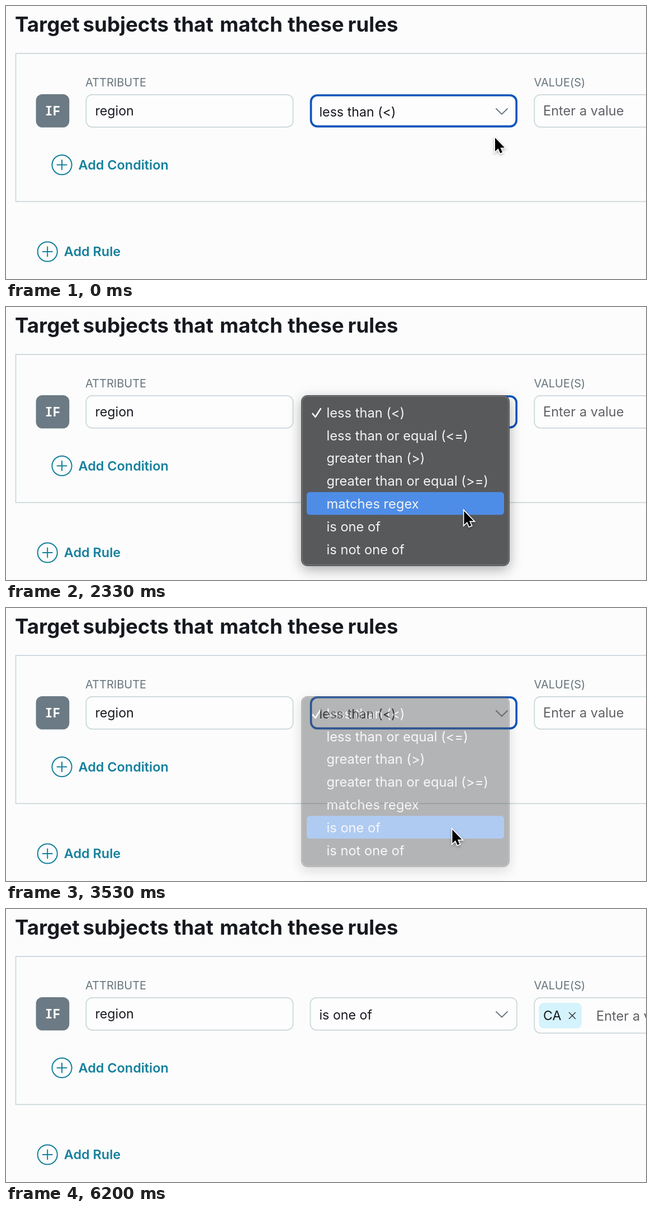
Recreate the animation shown at these times as an HTML page. Size 1145 px wide and 489 px high, loop 6270 ms.

```html
<!DOCTYPE html>
<html lang="en">
<head>
<meta charset="utf-8">
<title>Targeting rules</title>
<style>
  html, body { margin: 0; width: 100%; height: 100%; overflow: hidden; background: #fcfcfc; }
  svg { display: block; width: 100%; height: 100%; }
  text { font: 400 23.2px Inter, sans-serif; font-feature-settings: "calt" 0; fill: #16191f; white-space: pre; }
  .title { font-weight: 700; font-size: 36.7px; }
  .label { font-size: 20px; fill: #66757d; }
  .link { font-weight: 600; font-size: 23.4px; fill: #15809c; }
  .hint { font-size: 23.6px; fill: #606166; }
  .if { font: 700 23px "Noto Sans Mono", monospace; fill: #fff; }
  .item { font-size: 23.7px; fill: #f3f3f3; }
  .box { fill: #fdfdfd; stroke: #cad7da; stroke-width: 1.7; }
  .line { fill: none; stroke-linecap: round; stroke-linejoin: round; }
  .sheet { fill: #57595b; stroke: #404244; filter: drop-shadow(0 7px 11px rgba(0, 0, 0, .3)); }
  #arrow, #beam { filter: drop-shadow(0 2px 2px rgba(0, 0, 0, .3)); }
</style>
</head>
<body>
<svg viewBox="0 0 1145 489" preserveAspectRatio="none">
  <g id="title"></g>
  <rect x="17.5" y="85" width="1160" height="265.3" fill="none" stroke="#c9d8db" stroke-width="1.7"/>

  <text class="label" x="142" y="143.7">ATTRIBUTE</text>
  <text class="label" x="944.5" y="143.7">VALUE(S)</text>

  <rect x="53.6" y="158" width="59.7" height="59.5" rx="11.5" fill="#6b7a84"/>
  <text class="if" x="83.5" y="196" text-anchor="middle">IF</text>

  <rect class="box" x="143.3" y="158.8" width="370.2" height="58" rx="11"/>
  <text x="159.5" y="196">region</text>

  <rect class="box" x="544.5" y="158.8" width="369.5" height="58" rx="11"/>
  <rect id="focus" x="545.6" y="160" width="367.6" height="55.6" rx="11.5" fill="none" stroke="#0b54bf" stroke-width="3.6"/>
  <text id="choice" x="560.5" y="198"></text>
  <path class="line" d="M877 184l10 9.8l10-9.8" stroke="#6d7b86" stroke-width="2"/>

  <rect id="field" class="box" x="945.3" y="158.8" width="260" height="58" rx="11"/>
  <g id="chip">
    <rect x="953.3" y="168" width="76.7" height="45.8" rx="9" fill="#d4f3fc"/>
    <text x="961" y="198.7">CA</text>
    <path class="line" d="M1007.5 185.5l11 11m0-11l-11 11" stroke="#3c4248" stroke-width="1.6"/>
  </g>
  <text id="hint" class="hint">Enter a value</text>
  <text id="typed" x="972.5" y="199.5"></text>
  <rect id="caret" y="178" width="1.8" height="27" fill="#16191f"/>

  <g id="links"></g>

  <g id="menu">
    <rect class="sheet" x="528.5" y="158.5" width="372" height="305" rx="10.5"/>
    <rect x="529.8" y="159.8" width="369.4" height="302.4" rx="9.5" fill="none" stroke="#7d7f81" stroke-width="1.2"/>
    <rect id="mark" x="538" width="353" height="40.8" rx="5.5" fill="#4e8de7"/>
    <path class="line" d="M548.5 191l5 6l9.5-15" stroke="#fff" stroke-width="2.5"/>
    <g id="items"></g>
  </g>

  <path id="arrow" d="M0 0V24.5L5.6 19.2L9.2 27.6L13 26L9.4 17.7H17Z" fill="#000" stroke="#fff" stroke-width="3.4" paint-order="stroke"/>
  <g id="beam" class="line">
    <path id="beamHalo" stroke="#fff" stroke-width="4.5"/>
    <path id="beamCore" stroke="#111" stroke-width="2"/>
  </g>
</svg>
<script>
const LOOP = 6270, TICK = 1000 / 15;
const ROW_TOP = 168.3, ROW = 40.8;
const OPEN = 930, FADE = 3333, CLOSED = 3600, FOCUS = 4470, KEY_C = 5060, KEY_A = 5390, ENTER = 5995;

const $ = id => document.getElementById(id);
const set = (id, attrs) => { for (const k in attrs) $(id).setAttribute(k, attrs[k]); };
const show = (id, on) => set(id, { visibility: on ? "visible" : "hidden" });
const clamp = v => Math.min(1, Math.max(0, v));

function add(parent, tag, attrs, text = "") {
  const el = document.createElementNS("http://www.w3.org/2000/svg", tag);
  for (const k in attrs) el.setAttribute(k, attrs[k]);
  el.textContent = text;
  $(parent).append(el);
}

const titleX = [16, 137.5, 300, 382.5, 504, 611.5];
"Target subjects that match these rules".split(" ").forEach((word, i) =>
  add("title", "text", { class: "title", x: titleX[i], y: 45.5 }, word));

[["Add Condition", 100, 284.5], ["Add Rule", 74.2, 440]].forEach(([text, x, y]) => {
  add("links", "path", {
    class: "line", stroke: "#15809c", "stroke-width": 2,
    d: `M${x - 17.6} ${y}a17.6 17.6 0 1 0 35.2 0a17.6 17.6 0 1 0 -35.2 0M${x - 8.5} ${y}h17M${x} ${y - 8.5}v17`
  });
  add("links", "text", { class: "link", x: x + 29.6, y: y + 8 }, text);
});

["less than (<)", "less than or equal (<=)", "greater than (>)", "greater than or equal (>=)",
  "matches regex", "is one of", "is not one of"].forEach((text, i) =>
  add("items", "text", { class: "item", x: 573.5, y: ROW_TOP + ROW * i + 29.5 }, text));

const beamPath = "M-6 -14Q0 -14 0 -9.5Q0 -14 6 -14M0 -9.5V9.5M-6 14Q0 14 0 9.5Q0 14 6 14M-3.5 5H3.5";
set("beamHalo", { d: beamPath });
set("beamCore", { d: beamPath });

// Pointer stops: time, x, y
const stops = [
  [0, 875, 236], [200, 884, 184.5], [800, 884, 184.5], [930, 881, 193], [2000, 881, 193],
  [2330, 819.5, 365.5], [2600, 798.5, 397], [3600, 798.5, 397], [4060, 1020, 185.5], [LOOP, 1020, 185.5]
];

function pointer(t) {
  const i = Math.max(1, stops.findIndex(s => s[0] >= t));
  const [t0, x0, y0] = stops[i - 1], [t1, x1, y1] = stops[i];
  const p = clamp((t - t0) / (t1 - t0)), e = p * p * (3 - 2 * p);
  return [x0 + (x1 - x0) * e, y0 + (y1 - y0) * e];
}

function draw(time) {
  const t = Math.floor((time % LOOP + 4) / TICK) * TICK;
  const [x, y] = pointer(t);
  const picked = t >= CLOSED - 1, chip = t >= ENTER;
  const typed = chip || t < KEY_C ? "" : t < KEY_A ? "C" : "CA";

  show("menu", t >= OPEN && !picked);
  set("menu", { opacity: 1 - clamp((t - FADE) / (CLOSED - FADE)) ** 2 });
  set("mark", { y: ROW_TOP + ROW * Math.max(0, Math.floor((y - ROW_TOP) / ROW)) });

  $("choice").textContent = picked ? "is one of" : "less than (<)";
  show("focus", t < FOCUS);
  set("field", { height: picked ? 63.5 : 58 });
  set("hint", { x: chip ? 1056 : picked ? 972.5 : 961, y: picked ? 199.7 : 196.2 });
  show("hint", !typed);
  show("chip", chip);

  $("typed").textContent = typed;
  const lastKey = t >= KEY_A ? KEY_A : t >= KEY_C ? KEY_C : FOCUS;
  show("caret", t >= FOCUS && !chip && (t - lastKey) % 1000 < 500);
  set("caret", { x: [972, 990, 1005][typed.length] });

  const inField = x > 945 && y < 222;
  for (const id of ["arrow", "beam"]) set(id, { transform: `translate(${x} ${y})` });
  show("arrow", !inField);
  show("beam", inField && t < KEY_C);
}

const start = performance.now();
(function frame() {
  draw(performance.now() - start);
  requestAnimationFrame(frame);
})();
</script>
</body>
</html>
```
